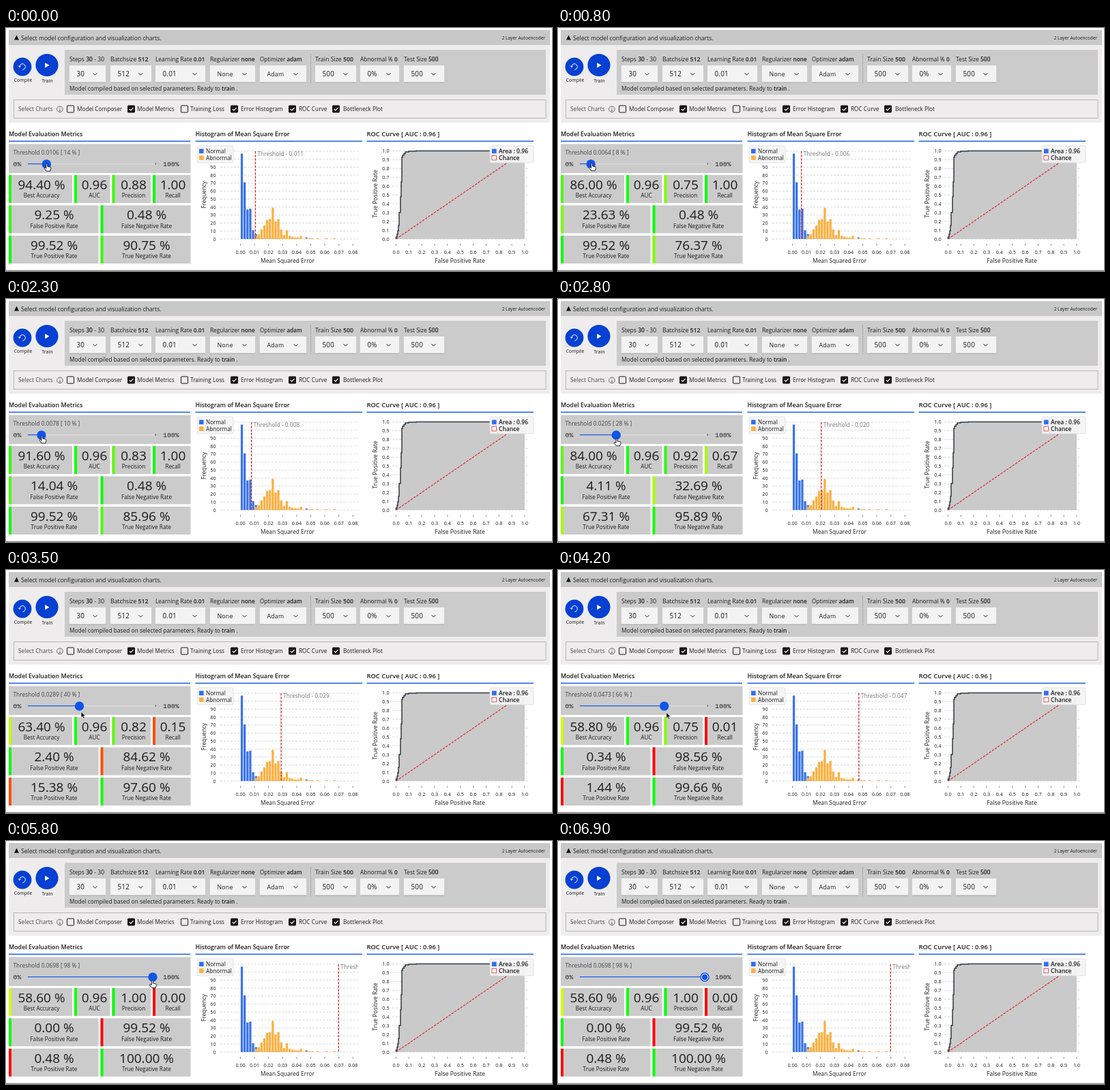
These frames come from a looping animation (800 px wide and 357 px high, 7000 ms). An HTML page:

```html
<!DOCTYPE html>
<html lang="en">
<head>
<meta charset="utf-8">
<title>Model evaluation</title>
<style>
html, body { margin: 0; width: 100%; height: 100%; overflow: hidden; background: #fff; }
svg { display: block; width: 800px; height: 357px; font-family: "Open Sans", "Noto Sans", sans-serif; }
text { fill: #1c1c1c; white-space: pre; }
.b { font-weight: 600; }
.mono { font-family: "Liberation Mono", monospace; }
</style>
</head>
<body>
<svg id="stage" viewBox="0 0 800 357"></svg>
<script>
const stage = document.getElementById('stage');
const BLUE = '#0f55e8', DEEP = '#0640d2', GREY = '#cbcbcb';
const out = [];

const attrs = o => Object.entries(o).map(([k, v]) => ` ${k}="${v}"`).join('');
const add = (tag, o, body = '') => out.push(`<${tag}${attrs(o)}>${body}</${tag}>`);
const rect = (x, y, w, h, fill, o = {}) => add('rect', { x, y, width: w, height: h, fill, ...o });
const line = (x1, y1, x2, y2, stroke, o = {}) => add('line', { x1, y1, x2, y2, stroke, ...o });
const path = (d, o) => add('path', { d, fill: 'none', ...o });
const circle = (cx, cy, r, fill, o = {}) => add('circle', { cx, cy, r, fill, ...o });
const text = (x, y, s, size = 8.2, o = {}) => add('text', { x, y, 'font-size': size, ...o }, s);
const mid = { 'text-anchor': 'middle' }, end = { 'text-anchor': 'end' };
const bold = s => `<tspan class="b">${s}</tspan>`;

function configPanel() {
  rect(4, 3, 793, 22, '#c8c8c8');
  rect(4, 25, 793, 114, '#eeeced');
  path('M12 17.5h7l-3.5-7z', { style: 'fill:#111' });
  text(22, 17.5, 'Select model configuration and visualization charts.', 8.6);
  text(790, 17, '2 Layer Autoencoder', 6.55, end);

  circle(24, 57, 13.4, DEEP);
  path('M19.8 57.4A4.3 4.3 0 1 1 24.4 61.2M18 55.6l1.8 2 2-1.8', { stroke: '#fff' });
  circle(60, 54.5, 16.6, DEEP);
  path('M57.2 51v7.4l6.4-3.7z', { style: 'fill:#fff' });
  text(25, 79, 'Compile', 6.9, mid);
  text(60.5, 80, 'Train', 7.1, mid);

  rect(86, 32, 705, 66, GREY);
  const selects = [
    [93, 53, 'Steps', '30', '30', 8.6, ' - 30'],
    [153, 60, 'Batchsize', '512', '512', 8.7],
    [219, 73, 'Learning Rate', '0.01', '0.01', 8.35],
    [299, 66, 'Regularizer', 'none', 'None', 8.25],
    [372, 68, 'Optimizer', 'adam', 'Adam', 8.1],
    [453, 60, 'Train Size', '500', '500', 8.8],
    [519, 57, 'Abnormal %', '0', '0%', 8.4],
    [583, 59, 'Test Size', '500', '500', 8.5]
  ];
  for (const [x, w, name, value, shown, size, tail = ''] of selects) {
    text(x, 49, `${name} ${bold(value)}${tail}`, size);
    rect(x, 55, w, 25, '#f3f3f3');
    line(x, 80, x + w, 80, '#8d8d8d', { 'stroke-width': .7 });
    text(x + 10.5, 71, shown, /\d/.test(shown) ? 9.9 : 8.8, { 'letter-spacing': .2 });
    path(`M${x + w - 18.5} 66.2l3 3 3-3`, { stroke: '#222' });
  }
  line(446.5, 38, 446.5, 81, '#888', { 'stroke-width': .7, 'stroke-dasharray': '2 1.2' });
  text(93, 92, `Model compiled based on selected parameters. Ready to ${bold('train')} .`, 8.37);

  rect(11.5, 105.5, 779.5, 27, 'none', { stroke: '#a9a9a9', 'stroke-width': .8 });
  text(18, 122.3, 'Select Charts', 8.4, { style: 'fill:#4a4a4a' });
  circle(79, 119.3, 4.3, 'none', { stroke: '#444', 'stroke-width': .8 });
  path('M79 118.5v3.2M77.8 121.7h2.4M78.6 116.8h.9', { stroke: '#444', 'stroke-width': .8 });
  const boxes = [
    [89, 104, 'Model Composer', 0], [178, 192, 'Model Metrics', 1], [256, 270, 'Training Loss', 0],
    [329, 344, 'Error Histogram', 1], [414, 429, 'ROC Curve', 1], [478, 494, 'Bottleneck Plot', 1]
  ];
  for (const [x, tx, label, on] of boxes) {
    rect(x + .5, 114, 10, 10, on ? '#161616' : 'none', { stroke: '#161616', rx: .8 });
    if (on) path(`M${x + 2.8} 119.2l2 2 3.8-4`, { stroke: '#fff', 'stroke-width': 1.2 });
    text(tx, 122.3, label, 8.25);
  }
}

function titles() {
  const heads = [[4, 'Model Evaluation Metrics', 8.9, 266], [277.5, 'Histogram of Mean Square Error', 8.9, 244.5],
    [528.5, 'ROC Curve [ AUC : 0.96 ]', 9.4, 244.5]];
  for (const [x, s, size, w] of heads) {
    text(x, 159, s, size, { class: 'b' });
    rect(x, 165.6, w, 1.5, '#1d5fdc');
  }
}

// id, x, width, row top, label, centre
const cards = [
  ['acc', 4, 93, 216, 'Best Accuracy', 52], ['auc', 100, 52.5, 216, 'AUC', 129.5],
  ['prec', 155.5, 56.5, 216, 'Precision', 187], ['rec', 215, 55.5, 216, 'Recall', 244.5],
  ['fpr', 4, 131.5, 260.5, 'False Positive Rate', 70.5], ['fnr', 138.5, 132, 260.5, 'False Negative Rate', 206],
  ['tpr', 4, 131.5, 305, 'True Positive Rate', 70.5], ['tnr', 138.5, 132, 305, 'True Negative Rate', 206]
];

function metricsPanel() {
  rect(4, 170.5, 266.5, 42.5, GREY);
  text(10.5, 186, '', 8.35, { id: 'info', style: 'fill:#444' });
  text(10.5, 203, '0%', 9.8, { class: 'mono' });
  text(230, 203, '100%', 9.8, { class: 'mono' });
  rect(32, 199, 187, 1.2, '#dedede');
  rect(218.6, 198, 1, 3, '#555');
  rect(32, 199, 0, 1.2, BLUE, { id: 'fill' });
  for (const [id, x, w, y, label, cx] of cards) {
    rect(x, y, w, 41, GREY);
    rect(x, y, 4, 41, '#0f0', { id: id + 'Bar' });
    text(cx, y + 20.9, '', 19, { id, ...mid });
    text(cx, y + 33.2, label, 8.2, mid);
  }
}

const X0 = 343.5, PER = 2060, BASE = 310;
const DASH = { 'stroke-dasharray': '3.5 1.7' };
const normal = [107, 71, 37, 38, 11, 6, 2, 2, 1, 1, 1, 1, 1, 1, 1, 1, 0, 1, 0, 1, 0, 0, 0, 2];
const abnormal = [0, 0, 0, 0, 0, 4, 6, 12, 17, 24, 25, 39, 22, 25, 12, 5, 11, 4, 3, 2, 2, 4, 0, 1, 1, 1, 0, 1, 0, 0, 1, 0, 0, 1];

function legend(x, w, rows, cls = '') {
  rect(x, 173, w, 25, '#f5f5f5', { stroke: '#dcdcdc', 'stroke-width': .7, rx: 2, 'fill-opacity': .92 });
  rows.forEach(([s, fill, stroke], i) => {
    const y = 177.6 + i * 9.7;
    rect(x + 3, y, 6.6, 6.6, fill, { stroke, 'stroke-width': .8 });
    text(x + 13, y + 6.6, s, cls ? 8.6 : 8.2, { class: cls });
  });
}

function grid(x1, x2, y, label, lx) {
  line(x1, y, x2, y, '#cfcfcf', { 'stroke-width': .8, 'stroke-dasharray': '3 2' });
  text(lx, y + 2.5, label, 7.2, end);
}

function xTick(x, label) {
  line(x, 317, x, 320, '#777', { 'stroke-width': .8 });
  text(x, 332.3, label, 7.2, mid);
}

function histogram() {
  for (let n = 0; n <= 110; n += 10) grid(314, 516, BASE - n * 1.173, n, 307.5);
  for (let i = 0; i <= 8; i++) xTick(X0 + i * 20.6, (i / 100).toFixed(2));
  const bars = (list, fill) => list.forEach((n, i) => {
    if (n) rect(X0 + .4 + i * 4.12, BASE - n * 1.173, 3.3, n * 1.173, fill);
  });
  bars(normal, '#3b74ea');
  bars(abnormal, '#fbb040');
  text(412.5, 345, 'Mean Squared Error', 8.4, mid);
  text(0, 0, 'Frequency', 8.3, { ...mid, transform: 'translate(293 245) rotate(-90)' });
  line(0, 181, 0, BASE, '#d02a2a', { id: 'mark', 'stroke-width': 1.3, ...DASH });
  add('clipPath', { id: 'plot' }, '<rect x="314" y="170" width="202" height="145"/>');
  add('g', { 'clip-path': 'url(#plot)' }, '<text id="markText" y="188" font-size="8.4" style="fill:#777"></text>');
  legend(280, 53, [['Normal', '#2f6df0', 'none'], ['Abnormal', '#fbb040', 'none']]);
}

function roc() {
  const curve = 'M571.5 310V307H573V303H574V298H575V290H576V271H578V248H579V226H580V190H581V187H583V184.5H585V182H590V181H601V180.5H760';
  for (let i = 0; i <= 10; i++) {
    grid(566, 766, BASE - i * 12.95, (i / 10).toFixed(1), 561.5);
    xTick(571.5 + i * 18.85, (i / 10).toFixed(1));
  }
  path(curve + 'V310Z', { style: 'fill:#cacaca' });
  line(571.5, BASE, 760, 180.5, '#e0262b', { 'stroke-width': 1.2, ...DASH });
  path(curve, { stroke: '#2e3a46', 'stroke-width': 1.5 });
  text(665, 345, 'False Positive Rate', 8.6, mid);
  text(0, 0, 'True Positive Rate', 8.5, { ...mid, transform: 'translate(544 243.5) rotate(-90)' });
  legend(709, 64, [['Area : 0.96', '#2f6df0', 'none'], ['Chance', '#fff', '#e0262b']], 'b');
}

function pointer() {
  circle(0, 200, 6.7, BLUE, { id: 'knob' });
  circle(0, 200, 4.8, 'none', { id: 'ring', stroke: '#fff', 'stroke-width': 1 });
  const style = { fill: '#111', stroke: '#fff', 'stroke-width': .7 };
  add('path', { id: 'arrow', d: 'M0 0V9L2 7.2 3.6 10.6 5.2 9.8 3.7 6.6H6.4Z', ...style });
  add('path', { id: 'hand', d: 'M-1 .8Q0-.6 1 .8V4.2L5.2 5.2Q6.3 5.6 6 7L5 11H-.6L-3.8 7Q-4 5.4-2.4 5.8L-1 7Z',
    fill: '#fff', stroke: '#111', 'stroke-width': .9, 'stroke-linejoin': 'round' });
}

configPanel();
titles();
metricsPanel();
histogram();
roc();
pointer();
rect(0, 355.7, 800, 1.3, '#8c8c8c');
stage.innerHTML = out.join('');

const $ = id => document.getElementById(id);
const set = (id, o) => { for (const k in o) $(id).setAttribute(k, o[k]); };

// Piecewise linear value through [position, value] points.
function lerp(points, x) {
  const i = points.findIndex(p => p[0] >= x);
  if (i < 0) return points[points.length - 1][1];
  if (!i) return points[0][1];
  const [a, va] = points[i - 1], [b, vb] = points[i];
  return va + (vb - va) * (x - a) / (b - a);
}

const percentAt = [[0, 14], [1600, 2], [2300, 10], [3100, 38], [3400, 38], [3500, 40], [4200, 66], [5000, 90], [5900, 98]];
const shiftAt = [[0, .5], [1600, 2], [2300, 1], [3500, 2.5], [4200, 3], [5000, 1]];
const heightAt = [[0, 199.2], [1600, 198.2], [2300, 200.8], [3100, 207], [3500, 208], [4200, 209], [5000, 205.7], [6400, 204]];
const falsePos = [[0, 250], [2, 178], [4, 128], [6, 96], [8, 69], [10, 41], [12, 33], [14, 27], [20, 18], [28, 12], [40, 7], [66, 1], [90, 0]];
const falseNeg = [[2, 0], [10, 1], [14, 1], [20, 17], [24, 37], [28, 68], [30, 85], [34, 135], [36, 148], [40, 176], [44, 190], [50, 200], [66, 205], [90, 207]];
const NEG = 292, POS = 208;

function metric(id, value, good, percent) {
  $(id).textContent = percent ? (value * 100).toFixed(2) + ' %' : value.toFixed(2);
  set(id + 'Bar', { fill: `hsl(${120 * good},100%,50%)` });
}

function draw(ms) {
  const t = Math.floor(ms / 100) * 100;
  const raw = lerp(percentAt, t), p = 2 * Math.round(raw / 2);
  const limit = .0007792 + .0007042 * p;
  const fp = Math.round(lerp(falsePos, p)), fn = Math.round(lerp(falseNeg, p)), tp = POS - fn;
  const x = 33.4 + 1.853 * p, mx = X0 + PER * limit;

  $('info').textContent = `Threshold ${limit.toFixed(4)} [ ${p} % ]`;
  $('markText').textContent = `Threshold - ${limit.toFixed(3)}`;
  set('mark', { x1: mx, x2: mx });
  set('markText', { x: mx + 3 });
  set('fill', { width: x - 32 });
  set('knob', { cx: x });
  set('ring', { cx: x, visibility: t >= 6500 ? 'visible' : 'hidden' });

  const acc = 1 - (fp + fn) / (NEG + POS), prec = tp / (tp + fp), rec = tp / POS, fpr = fp / NEG;
  metric('acc', acc, acc, true);
  metric('auc', .96, .96);
  metric('prec', prec, prec);
  metric('rec', rec, rec);
  metric('fpr', fpr, 1 - fpr, true);
  metric('fnr', 1 - rec, rec, true);
  metric('tpr', rec, rec, true);
  metric('tnr', 1 - fpr, 1 - fpr, true);

  const isArrow = t >= 2900 && t < 4700, shown = t < 6500;
  const transform = `translate(${33.4 + 1.853 * raw + lerp(shiftAt, t)} ${lerp(heightAt, t)})`;
  set('arrow', { transform, visibility: shown && isArrow ? 'visible' : 'hidden' });
  set('hand', { transform, visibility: shown && !isArrow ? 'visible' : 'hidden' });
}

function tick() {
  draw(performance.now() % 7000);
  requestAnimationFrame(tick);
}
tick();
</script>
</body>
</html>
```
